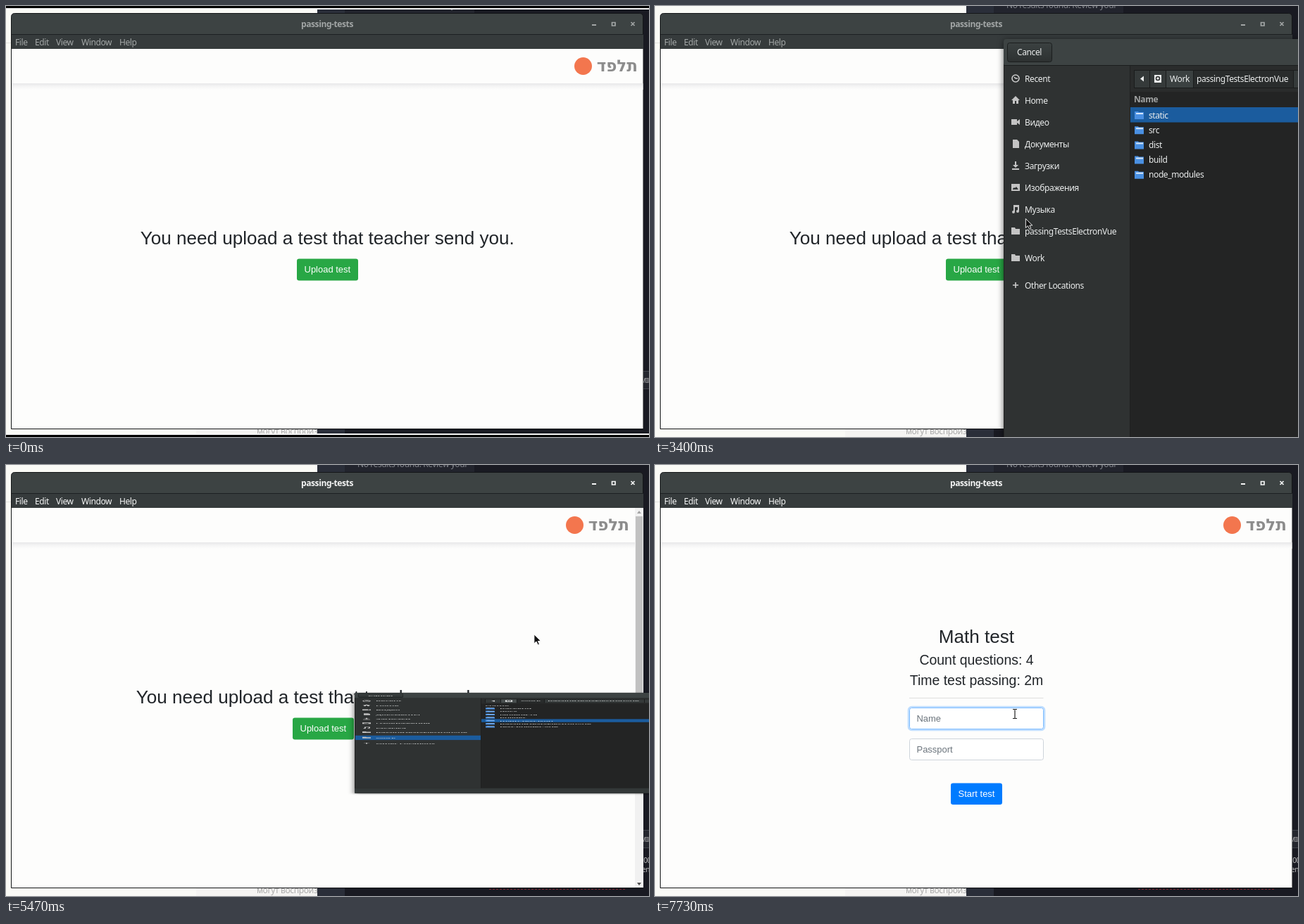
Recreate the animation shown at these times as an HTML page. Size 913x613 px, loop 8 s.

```html
<!DOCTYPE html>
<html lang="en">
<head>
<meta charset="utf-8">
<style>
html, body { margin: 0; width: 913px; height: 613px; overflow: hidden; background: #1a1b22; }
svg { display: block; }
text { white-space: pre; }
.ui { font: 12px "Noto Sans", "Open Sans", sans-serif; letter-spacing: -.4px; }
.ui .b { font-weight: 700; }
.page { font: 12.96px "Liberation Sans", Arial, sans-serif; fill: #212529; }
.h1 { font-size: 26.08px; }
.h2 { font-size: 19.45px; }
.mid { text-anchor: middle; }
.white { fill: #fff; }
.hint { fill: #6c757d; }
#dialog { filter: drop-shadow(0 2px 5px rgba(0, 0, 0, .6)); }
</style>
</head>
<body>
<svg id="stage" width="913" height="613"></svg>
<script>
const rect = (x, y, w, h, fill, more = '') =>
  `<rect x="${x}" y="${y}" width="${w}" height="${h}" fill="${fill}" ${more}/>`;
const text = (x, y, s, cls = '', more = '') => `<text x="${x}" y="${y}" class="${cls}" ${more}>${s}</text>`;
const path = (d, more = '') => `<path d="${d}" ${more}/>`;
const group = (id, body, more = '') => `<g id="${id}" ${more}>${body}</g>`;
const grad = (id, ...stops) => `<linearGradient id="${id}" x2="0" y2="1">` +
  stops.map((c, i) => `<stop offset="${i / (stops.length - 1)}" stop-color="${c}"/>`).join('') + '</linearGradient>';

const desktop = rect(0, 0, 442, 613, '#fafaf6') + rect(0, 52, 8, 1, '#e4e4e0') + rect(270, 602, 172, 11, '#f5f4f2') +
  text(356, 609, 'могут воспроизводить', '', 'fill="#aaa"') +
  rect(442, 0, 471, 613, '#191a22') + rect(442, 0, 39, 613, '#2a2e39') + rect(481, 0, 184, 12, '#22242d') +
  text(499, 2.5, 'No results found. Review your', '', 'fill="#80838a"') +
  rect(905, 519, 8, 26, '#24262e') + rect(905, 519, 8, 1, '#41444c') + rect(905, 544, 8, 1, '#41444c') +
  text(901, 536, 'MIN', '', 'fill="#bbb" font-size="9"') +
  group('log', text(903, 566, '.00', '', 'fill="#bbb" font-size="10"') +
    text(903, 579, 'en', '', 'fill="#bbb" font-size="10"') +
    path('M686 603.5H880', 'stroke="#7a2630" stroke-dasharray="3 2"')) +
  group('error', text(696, 616, 'Electron', '',
    'fill="#e0393f" style="font:bold 11px \'DejaVu Sans Mono\',monospace"')) +
  group('bars', rect(0, 0, 913, 3, '#000') + rect(0, 3, 913, 2, '#f4f4f4') +
    rect(0, 608, 913, 2, '#f4f4f4') + rect(0, 610, 913, 3, '#000'));

const menus = [[13, 'File'], [41, 'Edit'], [71, 'View'], [107, 'Window'], [161, 'Help']];
const frame = path('M7.5 601.5V15.5q0-5 5-5H899.5q5 0 5 5V601.5Z', 'fill="url(#bar)" stroke="#141618"') +
  rect(8, 40, 897, 1, '#1d2022') + rect(8, 41, 897, 20, '#363b3c') +
  group('chrome', text(456, 29.5, 'passing-tests', 'b mid') + menus.map(m => text(m[0], 55.5, m[1])).join('') +
    rect(832, 26, 6, 2, 'currentColor') +
    path('M860.5 23.5h4.500v4.500h-4.500zM887.500 23l5 5m0-5l-5 5', 'fill="none" stroke="currentColor" stroke-width="1.7"'),
    'fill="currentColor"') +
  rect(8, 61, 896.5, 540, '#fdfdfc') + rect(8, 110, 896.5, 9, 'url(#shade)');

const logo = group('logo', '<circle cx="819.5" cy="85.5" r="12.5" fill="#f3764e"/>' +
  text(897, 93, 'תלפד', '', 'text-anchor="end" fill="#8c8c8c" style="font:bold 23px \'DejaVu Sans\',sans-serif"'));

const upload = group('upload', text(456.3, 338.5, 'You need upload a test that teacher send you.', 'h1 mid') +
  rect(413, 359.5, 87, 31, '#28a745', 'rx="3.2" id="send"') + text(456.3, 379, 'Upload test', 'mid white'));

const field = (y, label, id) => rect(361.5, y, 190, 30, '#fff', `rx="3" stroke="#ced4da" id="${id}"`) +
  text(371.5, y + 19, label, 'hint');
const form = group('form', text(456.5, 252.5, 'Math test', 'h1 mid') + text(456.5, 284, 'Count questions: 4', 'h2 mid') +
  text(456.5, 313, 'Time test passing: 2m', 'h2 mid') + rect(361, 331, 190.5, 1, '#dedede') +
  rect(360, 344, 193, 33, 'none', 'rx="4.500" stroke="#bfdeff" stroke-width="2.600" id="ring"') +
  field(345.5, 'Name', 'name') + field(389.5, 'Passport', 'passport') + rect(372, 353, 1, 14, '#495057', 'id="caret"') +
  rect(420, 452.5, 73, 30.5, '#007bff', 'rx="3.2"') + text(456.5, 472, 'Start test', 'mid white'));

const scrollbar = group('scroll', rect(893, 61, 12, 540, '#f1f1f1') + rect(894, 73, 10, 257, '#c1c1c1') +
  path('M896 69l3-4 3 4z', 'fill="#a3a3a3"') + path('M896 594l3 4 3-4z', 'fill="#505050"'));

// Icons are drawn around 0,0
const line = 'fill="none" stroke="#ccc" stroke-width="1.6"';
const icons = {
  clock: path('M-5 0a5 5 0 1 0 10 0a5 5 0 1 0-10 0M-2-2L0 0H3', line),
  home: path('M-6 0L0-6 6 0H4V5H1V1H-1V5H-4V0Z'),
  video: path('M-6-4H2V-1L6-4V4L2 1V4H-6Z'),
  doc: path('M-4-6H2L5-3V6H-4Z'),
  down: path('M-1-6H1V-1H4L0 3-4-1H-1ZM-5 4H5V6H-5Z'),
  image: path('M-6-5H6V5H-6ZM-4-3V3H4L1-1-1 1-2 0-4 2Z', 'fill-rule="evenodd"'),
  music: path('M-3-6H5V3A2 2 0 1 1 3 1V-3H-1V4A2 2 0 1 1-3 2Z'),
  folder: path('M-6-5H-1L0-3H6V5H-6Z'),
  plus: path('M-4 0H4M0-4V4', line)
};
const places = [['clock', 'Recent', 103], ['home', 'Home', 134], ['video', 'Видео', 165], ['doc', 'Документы', 196],
  ['down', 'Загрузки', 227], ['image', 'Изображения', 258], ['music', 'Музыка', 289],
  ['folder', 'passingTestsElectronVue', 320], ['folder', 'Work', 358], ['plus', 'Other Locations', 397]];
const place = ([icon, label, y]) => `<g transform="translate(512 ${y})" fill="#c4c4c4">${icons[icon]}</g>` +
  text(525, y + 4.5, label);
const list = (id, names) => group(id, names.map((n, i) => {
  const y = 155 + i * 21.2;
  return path(`M681 ${y - 5}h5l1 1h7v10h-13z`, 'fill="#4a90e2"') + rect(683, y - 3, 10, 2, '#d5e6fa') + text(701, y + 4.5, n);
}).join(''));
const tab = (x, w, id) => rect(x + .5, 91.5, w, 25, '#353a3a', `stroke="#1a1c1c" id="${id}"`);

const dialog = group('dialog',
  rect(495, 47, 440, 696, '#232424', 'rx="5"') + rect(495, 47, 440, 38, 'url(#bar)', 'rx="4"') +
  rect(495, 84, 440, 1, '#1b1e1e') + rect(496, 85, 178, 624, '#2f3232') + rect(674, 85, 1, 624, '#1f2121') +
  rect(675, 85, 260, 37, '#2a2c2c') + rect(495, 709, 440, 34, '#333838') +
  rect(500.5, 52.5, 63, 27, 'url(#button)', 'rx="3" stroke="#1b1e1e"') + text(514, 69.5, 'Cancel') +
  rect(496, 343, 178, 31, '#1b5c9e', 'id="placeSel"') + places.map(place).join('') +
  tab(680, 22, 'back') + tab(702, 23, 'disk') + tab(725, 39, 'work') + tab(764, 142, 'project') + tab(906, 20, 'next') +
  path('M694 99.500v8l-5-4z') + path('M709 98h10v11h-10z') +
  '<circle cx="714" cy="103" r="2.500" fill="none" stroke="#2a2d2d" stroke-width="1.500"/>' +
  text(731, 107.5, 'Work') + text(769, 107.5, 'passingTestsElectronVue') +
  text(680, 137, 'Name', 'b', 'fill="#a0a2a2"') + rect(675, 144, 260, 21.5, '#1b5c9e', 'id="rowSel"') +
  list('project-files', ['static', 'src', 'dist', 'build', 'node_modules']) +
  list('work-files', ['backend', 'docs', 'landing-ui', 'builder', 'math-test.json', 'passingTestsElectronVue', 'test-builder-vue']),
  'class="ui" fill="#eceeee"');

const pointers = group('pointer',
  group('arrow', path('M0 0V13L3 10 5.500 15 7.500 14 5.500 9.500H9.500Z', 'fill="#111" stroke="#fff" stroke-width=".9"')) +
  group('hand', path('M0 0q2-1 2 1V5H8q1.500 0 1.500 2V12H1.500L-2 7q0-1.500 2-.5Z', 'fill="#111" stroke="#fff" stroke-width=".9"')) +
  group('beam', path('M-3-6.500h2.500l.5.5.5-.5h2.500M0-6V6M-3 6.500h2.500l.5-.5.5.5h2.500', 'fill="none" stroke="#222" stroke-width="1.200"')));

stage.innerHTML = '<defs>' +
  `<linearGradient id="bar" gradientUnits="objectBoundingBox" x2="0" y2="1"><stop stop-color="#3d4343"/></linearGradient>` +
  grad('button', '#3b4141', '#2d3131') + grad('shade', '#e8e8e9', '#f5f5f5', '#fdfdfc') + '</defs>' +
  `<g class="ui">${desktop}${frame}</g><g class="page">${logo}${upload}${form}</g>${scrollbar}${dialog}${pointers}`;

const el = id => document.getElementById(id);
const show = (id, on) => el(id).style.display = on ? '' : 'none';
const set = (id, name, value) => el(id).setAttribute(name, value);
const ramp = (t, a, b) => Math.min(1, Math.max(0, (t - a) / (b - a)));
const ease = k => k * k * (3 - 2 * k);
const mix = (a, b, k) => `rgb(${a.map((v, i) => Math.round(v + (b[i] - v) * k))})`;

// Pointer stops: time, x, y
const stops = [[800, 798, 92], [1000, 640, 420], [1130, 375, 545], [1330, 448, 375], [3130, 448, 375], [3930, 742, 103],
  [4270, 742, 103], [4800, 752, 275], [4870, 752, 275], [5200, 750, 241], [6530, 749, 241], [7000, 511, 354], [8000, 511, 354]];
function pointerAt(t) {
  const i = Math.max(1, stops.findIndex(s => s[0] > t));
  const [a, b] = [stops[i - 1], stops[i]], k = ease(ramp(t, a[0], b[0]));
  return [a[1] + (b[1] - a[1]) * k, a[2] + (b[2] - a[2]) * k];
}

function draw(t) {
  const open = t >= 2270 && t < 5530, inWork = t >= 4270;
  const active = t >= 130 && t < 2270 || t >= 5470;
  el('chrome').style.color = active ? '#f4f5f5' : '#a2a6a6';
  show('bars', t < 400);
  set('bars', 'opacity', 1 - ramp(t, 70, 400));
  show('error', t >= 130 && t < 2470);
  show('log', t >= 2270);

  const hover = ramp(t, 1230, 1330) - ramp(t, 3130, 3280), press = t >= 2000 && t < 2270 ? ramp(t, 2000, 2070) : 0;
  set('send', 'fill', mix([40, 167, 69], [33 - 3 * press, 136 - 10 * press, 56 - 4 * press], hover));

  const scrolling = t >= 5470 && t < 5770;
  show('scroll', scrolling);
  set('logo', 'transform', `translate(${scrolling ? -12 : 0})`);
  set('upload', 'transform', `translate(${scrolling ? -6 : 0})`);
  set('upload', 'opacity', 1 - ramp(t, 5530, 5770));
  set('form', 'opacity', ramp(t, 5770, 6070));

  show('dialog', open);
  const size = t >= 5470 ? .205 : .1 + .9 * ease(ramp(t, 2270, 2450));
  set('dialog', 'transform', `translate(0 ${395.5 * (1 - size)}) scale(1 ${size})`);
  show('project-files', !inWork);
  show('work-files', inWork);
  show('placeSel', inWork);
  show('rowSel', !inWork || t >= 5130);
  set('rowSel', 'y', inWork ? 229 : 144);
  const pressed = t >= 4000;
  set('disk', 'fill', pressed ? '#484e4e' : '#353a3a');
  set('work', 'fill', pressed ? '#292c2c' : '#3b4141');
  set('project', 'fill', inWork ? '#353a3a' : '#292c2c');

  const focus = ramp(t, 7200, 7350);
  set('ring', 'opacity', focus);
  set('name', 'stroke', mix([206, 212, 218], [128, 189, 255], focus));
  show('caret', t >= 7200 && t < 7730);

  const [x, y] = pointerAt(t);
  const hand = x > 413 && x < 500 && y > 360 && y < 390 && t < 3300;
  const beam = t > 6530 && x < 552 && y > 345;
  show('pointer', t >= 800);
  set('pointer', 'transform', `translate(${x} ${y})`);
  show('hand', hand);
  show('beam', beam);
  show('arrow', !hand && !beam);
}

const start = performance.now();
function tick() {
  draw((performance.now() - start) % 8000);
  requestAnimationFrame(tick);
}
tick();
</script>
</body>
</html>
```
